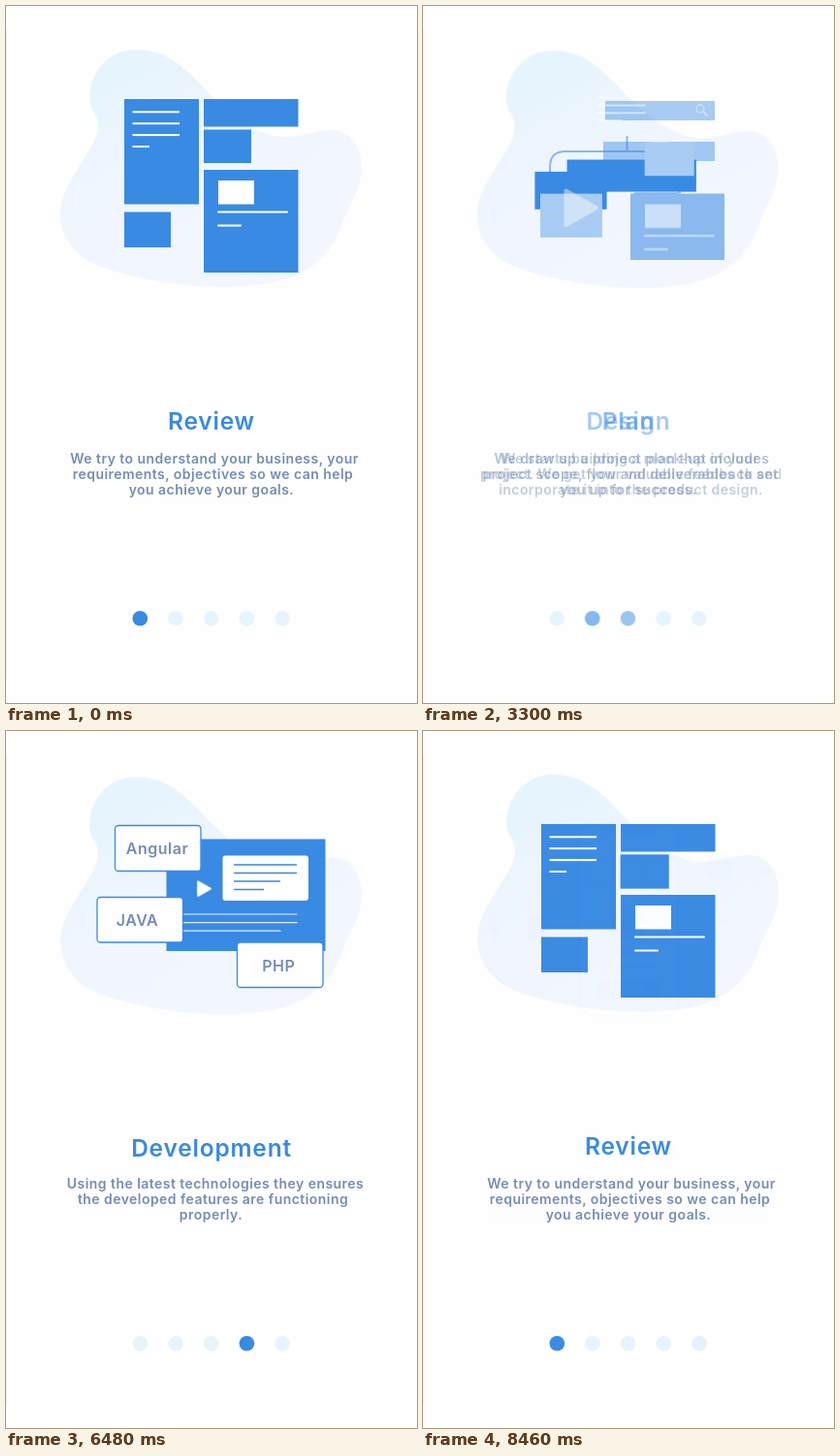
An HTML page that plays this animation: 424x719 px, repeating every 8.5 s.

```html
<!DOCTYPE html>
<html lang="en">
<head>
<meta charset="utf-8">
<title>Project steps</title>
<style>
  html, body { margin: 0; width: 100%; height: 100%; overflow: hidden; background: #fefefe; }
  svg { display: block; width: 424px; height: 719px; font-family: Montserrat, Inter, sans-serif; font-weight: 600; }
  text { text-anchor: middle; }
  .title { font-size: 24.5px; letter-spacing: .8px; fill: #398ae3; }
  .body { font-size: 14px; letter-spacing: .45px; fill: #748db3; }
  .tag { font-size: 16px; letter-spacing: .5px; fill: #748db3; }
  .order { font-size: 9.8px; letter-spacing: .4px; fill: #fff; }
  .blue { fill: #398ae3; }
  .white { fill: #fff; }
  .pale { fill: #e6f4fe; }
  .line { fill: none; stroke: #398ae3; stroke-width: 2; }
  .thin { fill: none; stroke: #398ae3; stroke-width: 1.3; }
  .card { fill: #fff; stroke: #398ae3; stroke-width: 1.3; }
  .wire { fill: none; stroke: #fff; stroke-width: 2; stroke-linecap: round; }
</style>
</head>
<body>
<svg viewBox="0 0 424 719">
  <defs>
    <linearGradient id="tint" x1=".15" y1="0" x2=".75" y2=".9">
      <stop offset="0" stop-color="#e4f4fd"/>
      <stop offset=".55" stop-color="#f1f6fe"/>
      <stop offset="1" stop-color="#f3f6ff"/>
    </linearGradient>
    <clipPath id="column"><rect x="57" y="400" width="311.5" height="120"/></clipPath>
    <path id="star" d="M0-6.5 1.9-2.3 6.4-1.9 3 1.2 4 5.6 0 3.3-4 5.6-3 1.2-6.4-1.9-1.9-2.3Z"/>
  </defs>

  <rect y="24" width="1" height="672" fill="#f1f2f5"/>
  <path id="blob" fill="url(#tint)" d="M134 45C165 45 182 62 200 80C222 104 246 126 276 134C300 138 316 128 338 128C356 129 367 145 367 168C366 190 354 205 348 222C338 252 322 268 297 279C270 290 228 291 200 289C165 287 110 277 85 263C65 251 56 232 56 213C57 192 72 172 82 155C90 142 96 132 95 121C94 112 87 108 86 95C87 65 108 45 134 45Z"/>
  <g id="dots"></g>

  <g data-scene="1" class="line">
    <path d="M210.500 134V150M131 195V166Q131 150 147 150H249Q265 150 265 166V193"/>
  </g>
  <g data-scene="2" class="blue">
    <path d="M188 98h113v20H188ZM186 140h50v20h-50ZM251 140h50v20h-50Z"/>
  </g>

  <g id="boxes"></g>

  <g id="sheet">
    <rect class="white" x="219" y="180" width="37" height="24.500"/>
    <path class="wire" d="M219 212.500H290M219 226.500H242"/>
  </g>
  <g id="rows" class="white"></g>

  <g data-scene="2">
    <circle class="wire" cx="286" cy="106" r="4" style="stroke-width:1.3"/>
    <path class="wire" d="M289.500 109.500 293 113"/>
    <path class="line" d="M218 181H264M218 193H264"/>
  </g>

  <g data-scene="3">
    <rect class="white" x="223.500" y="128.500" width="88.500" height="46.500" rx="3"/>
    <path class="thin" d="M235 138H300M235 146.500H300M235 155H283M235 163.500H266"/>
    <path class="wire" style="stroke-width:1.2" stroke-opacity=".85" d="M182 189H300M182 197.700H300M182 206.200H283"/>
    <rect class="card" x="112.500" y="97.500" width="88.500" height="47" rx="3.500"/>
    <rect class="card" x="94" y="171.500" width="88.500" height="46.500" rx="3.500"/>
    <rect class="card" x="238.500" y="218" width="88.500" height="46.500" rx="3.500"/>
    <text class="tag" x="156" y="127">Angular</text>
    <text class="tag" x="135.500" y="201">JAVA</text>
    <text class="tag" x="281.300" y="247.500">PHP</text>
  </g>
  <path id="play" class="white" stroke="#fff" stroke-width="4" stroke-linejoin="round" d="M147.500 190.500 179 208.300 147.500 226Z"/>

  <g data-scene="4">
    <rect class="white" x="161.300" y="95.600" width="101.500" height="198" rx="13"/>
    <path fill="#e3f2fa" d="M162 126V109Q162 96 175 96H249Q262 96 262 109V126Z"/>
    <rect class="line" style="stroke-width:3" x="161.300" y="95.600" width="101.500" height="198" rx="13"/>
    <path class="blue" d="M183 95H240.500V101Q240.500 106 235.500 106H188Q183 106 183 101Z"/>
    <rect class="thin" x="168" y="132" width="27" height="25.500" rx="4"/>
    <rect class="thin" x="198.700" y="132" width="27" height="25.500" rx="4"/>
    <rect class="thin" x="229.400" y="132" width="27" height="25.500" rx="4"/>
    <g fill="#dcedfb">
      <use href="#star" transform="translate(190 174.500) scale(.6)"/>
      <use href="#star" transform="translate(212 168.500) scale(.6)"/>
      <use href="#star" transform="translate(233 174.500) scale(.6)"/>
    </g>
    <ellipse class="blue" cx="211" cy="207" rx="19.500" ry="7.500"/>
    <path fill="none" stroke="#fff" stroke-width="1.300" d="M196 206Q211 215 226 206"/>
    <path class="line" d="M226 197C232 194 233 200 226 203"/>
    <path class="blue" d="M191.500 188C192 199 199 208 210 208S228 199 228.500 188Z"/>
    <ellipse cx="210" cy="187.500" rx="18" ry="8.500" class="card" style="stroke-width:1.500"/>
    <ellipse cx="210" cy="187.800" rx="15" ry="6.500" class="blue"/>
    <path fill="none" stroke="#fff" stroke-width="1.500" d="M219 184C209 181 199 186 203 190C207 194 218 191 216 187C213 184 206 186 208 188.500H212"/>
    <g class="thin">
      <circle cx="189.700" cy="228.500" r="5.800"/>
      <circle cx="189.700" cy="242.700" r="5.800"/>
      <path d="M187 228.500 189 230.700 193 226.500M187 242.700 189 244.900 193 240.700"/>
    </g>
    <path class="line" style="stroke-width:3.300" d="M200.500 228.500H239.500M200.500 242.700H239.500"/>
    <rect class="blue" x="181" y="257.500" width="62" height="18.500" rx="3"/>
    <text class="order" x="212.200" y="270">ORDER</text>
    <g class="blue">
      <circle cx="74.500" cy="205" r="4.800"/>
      <circle cx="354" cy="146.500" r="4.800"/>
      <circle cx="119" cy="204" r="13"/>
      <circle cx="304.500" cy="140" r="15.500"/>
      <use href="#star" transform="translate(134 248.500) rotate(12)"/>
      <use href="#star" transform="translate(311 197) rotate(-10)"/>
    </g>
  </g>

  <g id="copy" clip-path="url(#column)"></g>
</svg>
<script>
const LOOP = 8500, FADE = 400, EASE = 'cubic-bezier(.6, 0, .4, 1)';
const starts = [1372, 3111, 4870, 6460, 8100];
const BLUE = '#398ae3', WHITE = '#fff';
const $ = id => document.getElementById(id);

function add(parent, tag, attrs, text = '') {
  const el = document.createElementNS('http://www.w3.org/2000/svg', tag);
  for (const k in attrs) el.setAttribute(k, attrs[k]);
  el.textContent = text;
  return parent.appendChild(el);
}

// Hold each of the five states, easing to the next at its start time.
function track(el, states) {
  const frames = [];
  states.forEach((s, i) => {
    frames.push({ ...s, offset: i ? (starts[i - 1] + FADE) / LOOP : 0, easing: 'linear' },
                { ...s, offset: starts[i] / LOOP, easing: EASE });
  });
  frames.push({ ...states[0], offset: 1 });
  el.animate(frames, { duration: LOOP, iterations: Infinity });
}

const showIn = (el, n) => track(el, starts.map((_, i) => ({ opacity: +(i === n) })));

const box = (x, y, r, b, fill = BLUE, opacity = 1) =>
  ({ x: x + 'px', y: y + 'px', width: r - x + 'px', height: b - y + 'px', fill, opacity });
const gone = state => ({ ...state, opacity: 0 });

// Moves through the given states, then fades out; the first state fades back in.
function morph(parent, states) {
  const last = states[states.length - 1];
  const all = [...states];
  while (all.length < 4) all.push(gone(last));
  all.push(gone(states.length < 4 ? states[0] : last));
  track(add(parent, 'rect', {}), all);
}

const boxes = $('boxes');
[
  [box(204, 96, 301.500, 124.500), box(170, 81, 267, 134), box(121, 258, 301, 265.500)],
  [box(122, 96, 199, 204.500), box(111, 195, 204, 248.500), box(121, 140, 171, 160)],
  [box(122, 212.500, 170, 249), box(236.500, 89.500, 263, 126, WHITE), box(218.500, 205.500, 301, 238.500)],
  [box(204, 127.500, 253, 162), box(121, 205, 170, 239, WHITE), box(121, 179, 204, 238.500), box(165.500, 111.500, 329.500, 227)],
  [box(204, 169, 301.500, 275), box(214, 193.500, 311, 262)]
].forEach(states => morph(boxes, states));

for (let i = 0; i < 4; i++) {
  const y = 108.300 + i * 11.900, to = 93.800 + i * 7.800;
  morph($('rows'), [
    box(130.500, y, i < 3 ? 179 : 148, y + 2, WHITE),
    box(180, to, i < 3 ? 229.500 : 205.500, to + 1.900, WHITE)
  ]);
}

const shift = (x, y, opacity = 1, scale = 1) =>
  ({ transform: `translate(${x}px, ${y}px) scale(${scale})`, opacity });

track($('sheet'), [shift(0, 0), shift(10, 24.500), shift(10, 24.500, 0), shift(0, 0, 0), shift(0, 0, 0)]);
track($('play'), [shift(0, 0, 0), shift(0, 0, 0), shift(0, 0), shift(136, 75.200, 1, .42), shift(136, 75.200, 0, .42)]);
track($('blob'), [shift(0, 0), shift(0, 0), shift(-1, 2.500), shift(0, 2.500), shift(0, 2.500)]);
track($('dots'), [shift(0, 0), shift(0, 0), shift(-.7, 0), shift(0, 0), shift(0, 0)]);

document.querySelectorAll('[data-scene]').forEach(el => showIn(el, +el.dataset.scene));

const pages = [
  ['Review', 437, 215, 'We try to understand your business, your', 213.500, 'requirements, objectives so we can help', 212, 'you achieve your goals.'],
  ['Plan', 437, 215.500, 'We draw up a project plan that includes', 214, 'project scope, flow and deliverables to set', 212, 'you up for success.'],
  ['Design', 437, 213.700, 'We starts building a mock-up of your', 215, 'project. We get your valuable feedback and', 214.500, 'incorporate it into the product design.'],
  ['Development', 439, 216, 'Using the latest technologies they ensures', 213.500, 'the developed features are functioning', 211.500, 'properly.'],
  ['Delivery', 439, 215, 'Prior to launching the project, we unveil it', 213.500, 'to you first so you can rest assured that', 214, 'your product will have a smooth launch.']
];

pages.forEach(([title, base, ...lines], n) => {
  const page = add($('copy'), 'g', {});
  add(page, 'text', { class: 'title', x: 212, y: base }, title);
  for (let i = 0; i < 3; i++)
    add(page, 'text', { class: 'body', x: lines[i * 2], y: 471.700 + i * 16.300 }, lines[i * 2 + 1]);
  showIn(page, n);

  const dot = { cx: 138.300 + n * 36.700, cy: 631.700, r: 7.800 };
  add($('dots'), 'circle', { ...dot, class: 'pale' });
  showIn(add($('dots'), 'circle', { ...dot, class: 'blue' }), n);
});
</script>
</body>
</html>
```
